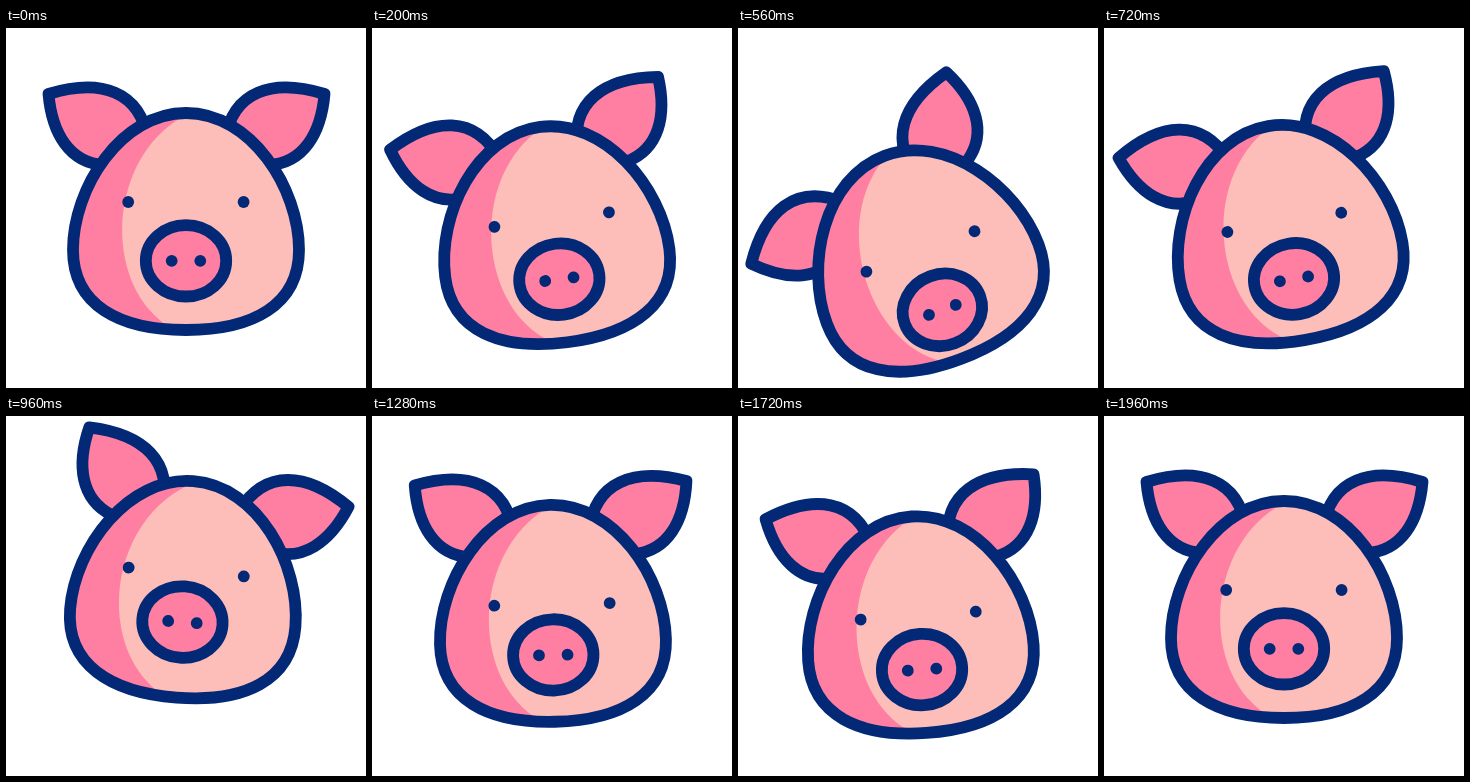
An HTML page for the animation above (2 s loop, 360 by 360 pixels).

```html
<!DOCTYPE html>
<html lang="en">
<head>
<meta charset="utf-8">
<title>Nodding pig</title>
<style>
  html, body { margin: 0; width: 100%; height: 100%; overflow: hidden; background: #fff; }
  svg { display: block; width: 100%; height: 100%; }
  .line { stroke: #022876; stroke-width: 11.8; stroke-linejoin: round; stroke-linecap: round; }
  .dark { fill: #ff7fa2; }
  .light { fill: #fdbeb9; }
  .dot { fill: #022876; }
</style>
</head>
<body>
<svg viewBox="0 0 360 360">
  <defs>
    <path id="skull" d="M180 85C245 85 293 160 293 222C293 277 247 302 180 302C113 302 67 277 67 222C67 160 115 85 180 85Z"/>
    <path id="ear" d="M142 112C134 63 95 50 42.5 66C46 106 64 135 98 137L112 138Z"/>
    <clipPath id="inside"><use href="#skull"/></clipPath>
  </defs>
  <g id="head">
    <g id="earLeft"><use href="#ear" class="dark line"/></g>
    <g id="earRight"><use href="#ear" class="dark line" transform="translate(361 0) scale(-1 1)"/></g>
    <use href="#skull" class="dark"/>
    <g clip-path="url(#inside)"><path id="face" class="light"/></g>
    <use href="#skull" fill="none" class="line"/>
    <g id="eyes" class="dot">
      <circle cx="122.2" cy="174" r="5.9"/>
      <circle cx="237.6" cy="174" r="5.9"/>
    </g>
    <g id="snout">
      <ellipse class="dark line" cx="180" cy="232.8" rx="40.2" ry="35.7"/>
      <circle class="dot" cx="165.7" cy="232.8" r="5.9"/>
      <circle class="dot" cx="194.3" cy="232.8" r="5.9"/>
    </g>
  </g>
</svg>
<script>
  const LOOP = 2000;
  // Ears, eyes and snout trail the head slightly.
  const HEAD_TIMES = [25, 480, 980, 1550, 1965];
  const SOFT_TIMES = [25, 490, 990, 1530, 1965];

  const part = id => document.getElementById(id);
  const pose = (id, value) => part(id).setAttribute('transform', value);
  const ease = p => (1 - Math.cos(Math.PI * p)) / 2;

  // Eased swing between the given values at the given times.
  function swing(t, times, values) {
    if (t <= times[0]) return values[0];
    for (let i = 1; i < times.length; i++) {
      if (t < times[i]) {
        const p = (t - times[i - 1]) / (times[i] - times[i - 1]);
        return values[i - 1] + (values[i] - values[i - 1]) * ease(p);
      }
    }
    return values[values.length - 1];
  }

  function draw(t) {
    const drop = swing(t, HEAD_TIMES, [0, 40.5, -20.3, 24, 0]);
    const tilt = swing(t, HEAD_TIMES, [0, -22.2, 4.5, -6.2, 0]);
    const left = swing(t, SOFT_TIMES, [0, -41.5, 20, -11.7, 0]);
    const right = swing(t, SOFT_TIMES, [0, -34, 18.7, -16.5, 0]);
    const gaze = swing(t, SOFT_TIMES, [0, 13.8, 2, 17.3, 0]);
    const sniff = swing(t, SOFT_TIMES, [0, 18, -6.7, 9.5, 0]);
    const bend = drop * 0.06;

    pose('head', `translate(0 ${drop}) rotate(${tilt} 180 180)`);
    pose('earLeft', `rotate(${left} 135 139)`);
    pose('earRight', `rotate(${right} 226 139)`);
    pose('eyes', `translate(0 ${gaze})`);
    pose('snout', `translate(0 ${sniff})`);
    part('face').setAttribute('d',
      `M178 88C${101 + 2 * bend} 130 ${95 + bend} 258 165 300L180 330H330V60H180Z`);
  }

  const start = performance.now();
  function tick() {
    draw((performance.now() - start) % LOOP);
    requestAnimationFrame(tick);
  }
  draw(0);
  requestAnimationFrame(tick);
</script>
</body>
</html>
```
